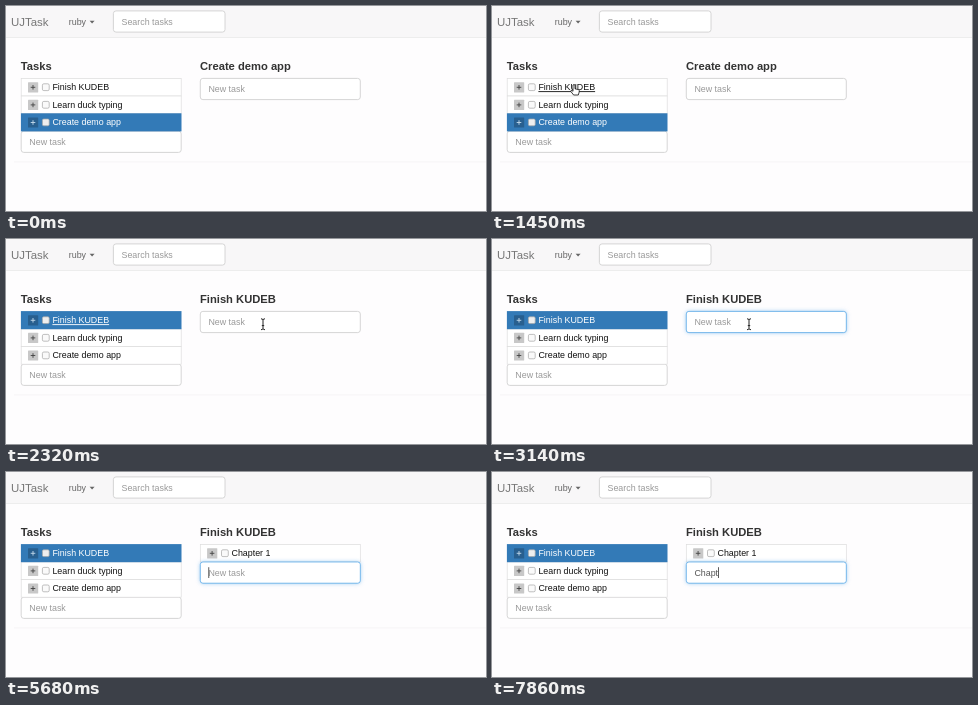
Recreate the animation shown at these times as an HTML page. Size 480x205 px, loop 8 s.

```html
<!DOCTYPE html>
<html lang="en">
<head>
<meta charset="utf-8">
<title>Task list</title>
<style>
  html, body { margin: 0; width: 100%; height: 100%; overflow: hidden; background: #fefdfe; }
  svg { display: block; width: 100vw; height: 100vh; }
  text { font: 8.9px "Liberation Sans", Arial, sans-serif; white-space: pre; }
  .brand { font-size: 11.43px; }
  .title { font-size: 11.2px; font-weight: bold; }
  .hover { text-decoration: underline; }
</style>
</head>
<body>
<svg id="stage" viewBox="0 0 480 205"></svg>
<script>
const LOOP = 8000;
const ROW = 17.6;
const LIST_TOP = 72.4;
const LEFT = 15.2;
const RIGHT = 194.3;
const WIDTH = 160;
const SELECT = 1640, FOCUS = 2500, TYPE = 3230, SUBMIT = 5640;
const tasks = ["Finish KUDEB", "Learn duck typing", "Create demo app"];

// Contents of the right-hand field over time.
const typing = [
  [0, ""], [TYPE, "C"], [3410, "Ca"], [3590, "Cah"], [3950, "Ca"], [4140, "C"],
  [4410, "Ch"], [4500, "Cha"], [4590, "Chap"], [4770, "Chapt"], [4910, "Chapte"],
  [5000, "Chapter"], [5090, "Chapter "], [5270, "Chapter 1"], [SUBMIT, ""],
  [6820, "C"], [6950, "Ch"], [7640, "Cha"], [7680, "Chap"], [7860, "Chapt"]
];
const caretOff = [[3050, TYPE], [6180, 6640], [7500, 7640]];

// Pointer waypoints: time, x, y.
const path = [
  [50, 8, 122], [350, 45, 120], [600, 88, 113], [820, 100, 111], [920, 98, 106],
  [1050, 89, 90], [1250, 84, 82], [1400, 82, 79], [1680, 82, 79], [1860, 120, 94],
  [2050, 200, 91], [2180, 291, 84], [2320, 257, 85], [TYPE, 257, 85]
];

const stage = document.getElementById("stage");
const measure = document.createElement("canvas").getContext("2d");
measure.font = '8.9px "Liberation Sans", Arial, sans-serif';

const clamp = v => Math.max(0, Math.min(1, v));
const within = (t, a, b) => t >= a && t < b;

const text = (x, y, value, fill, cls = "") =>
  `<text x="${x}" y="${y}" fill="${fill}" class="${cls}">${value}</text>`;

const rect = (x, y, w, h, fill, more = "") =>
  `<rect x="${x}" y="${y}" width="${w}" height="${h}" fill="${fill}" ${more}/>`;

function row(x, index, label, active, hover) {
  const y = LIST_TOP + index * ROW;
  const box = active
    ? rect(x - .3, y - .3, WIDTH + .6, ROW + .5, "#337ab7")
    : rect(x, y, WIDTH, ROW, "#fff", 'stroke="#ddd" stroke-width=".7"');
  const plus = `<path d="M${x + 9.5} ${y + 8.9}h4.6m-2.3-2.3v4.6" stroke="${active ? "#c5dbed" : "#444"}" stroke-width=".9"/>`;
  return box
    + rect(x + 6.8, y + 3.8, 10.2, 10.2, active ? "#285f8f" : "#c8c8c8", 'rx=".5"')
    + plus
    + rect(x + 21.2, y + 5.4, 6.8, 6.8, active ? "#eee" : "#fafafa", 'rx="1.4" stroke="#a5a5a5" stroke-width=".7"')
    + text(x + 31.2, y + 11.8, label, active ? "#fff" : "#111", hover ? "hover" : "");
}

function field(x, y, value, glow = 0, caret = false, placeholder = "New task") {
  const w = placeholder === "New task" ? WIDTH : 111.6;
  let out = "";
  if (glow) {
    out += rect(x, y, w, 21.2, "#66afe9",
      `rx="2.6" opacity="${glow}" style="filter:drop-shadow(0 0 2px rgba(102,175,233,.7))"`);
  }
  out += rect(x, y, w, 21.2, "#fff",
    `rx="2.6" stroke="${glow ? "#66afe9" : "#ccc"}" stroke-width=".8"`);
  out += text(x + 8.1, y + 13.8, value || placeholder, value ? "#555" : "#999");
  if (caret) out += rect(x + 8.1 + measure.measureText(value).width, y + 5.2, .8, 10.8, "#333");
  return out;
}

function pointer(t) {
  const next = path.findIndex(p => t < p[0]);
  if (next < 1) return "";
  const [t0, x0, y0] = path[next - 1];
  const [t1, x1, y1] = path[next];
  const k = (t - t0) / (t1 - t0);
  const ease = k * k * (3 - 2 * k);
  const x = x0 + (x1 - x0) * ease, y = y0 + (y1 - y0) * ease;
  let shape;
  if (x > RIGHT && y < 94) {
    shape = '<path d="M-2-5.2Q0-5.2 0-4Q0-5.2 2-5.2M0-4V4.5M-2 5.7Q0 5.7 0 4.5Q0 5.7 2 5.7M-1.2 1.6H1.2" fill="none" stroke="#222" stroke-width="1"/>';
  } else if (within(t, 600, 960) || within(t, 1250, 1760)) {
    shape = '<path d="M-1 0Q0-1 1 0V3.8L4.5 4.6Q5.6 5 5.2 7L4.3 10H-.4L-3.2 6.4Q-3.3 5-2 5.4L-1 6.3Z" fill="#fff" stroke="#111" stroke-width=".8"/>';
  } else {
    shape = '<path d="M0 0V8.8L2 7L3.4 10L5 9.3L3.7 6.4H6.4Z" fill="#111" stroke="#fff" stroke-width=".6"/>';
  }
  return `<g transform="translate(${x.toFixed(2)} ${y.toFixed(2)})">${shape}</g>`;
}

function navbar() {
  return rect(0, 0, 480, 31.3, "#f8f7f8")
    + rect(0, 31, 480, .7, "#e7e7e7")
    + text(5, 19.6, "UJTask", "#777", "brand")
    + text(62.8, 19, "ruby", "#666")
    + '<path d="M83.6 14.8h5l-2.5 2.6z" fill="#666"/>'
    + field(107.4, 4.9, "", 0, false, "Search tasks");
}

function scene(t) {
  const active = t < SELECT ? 2 : 0;
  const hovered = within(t, 600, 1080) ? 2 : within(t, 1250, 2770) ? 0 : -1;
  const submitted = t >= SUBMIT;
  const value = typing.filter(([time]) => t >= time).pop()[1];
  const caret = t >= FOCUS && !caretOff.some(([a, b]) => within(t, a, b));
  const rows = tasks.map((label, i) => i === active ? "" : row(LEFT, i, label, false, i === hovered));

  return navbar()
    + rect(8, 155.6, 472, .7, "#f0eff0")
    + text(14.8, 64, "Tasks", "#333", "title")
    + text(194, 64, tasks[active], "#333", "title")
    + field(LEFT, LIST_TOP + 3 * ROW, "")
    + rows.join("")
    + row(LEFT, active, tasks[active], true, active === hovered)
    + (submitted ? row(RIGHT, 0, "Chapter 1", false, false) : "")
    + field(RIGHT, LIST_TOP + (submitted ? ROW : 0), value, clamp((t - FOCUS + 50) / 100), caret)
    + pointer(t);
}

const start = performance.now();
let shown = "";
function draw() {
  const markup = scene((performance.now() - start) % LOOP);
  if (markup !== shown) stage.innerHTML = shown = markup;
  requestAnimationFrame(draw);
}
draw();
</script>
</body>
</html>
```
